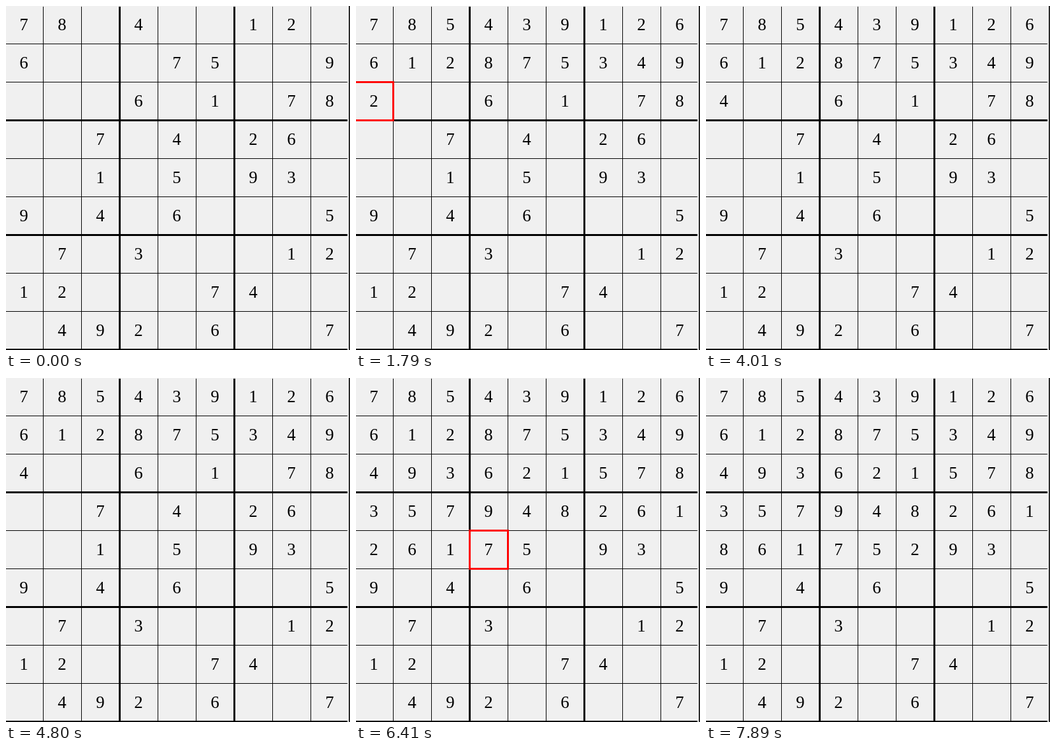
Animation, 540 px wide and 540 px high, one loop 8000 ms. Source, as an HTML page:

```html
<!DOCTYPE html>
<html lang="en">
<head>
<meta charset="utf-8">
<title>Sudoku backtracking</title>
<style>
  html, body { margin: 0; width: 100%; height: 100%; overflow: hidden; background: #f0f0f0; }
  svg { display: block; width: 540px; height: 540px; }
  line, rect { shape-rendering: crispEdges; }
  line { stroke: #000; }
  text { font: 27px "Liberation Serif", "Times New Roman", serif; text-anchor: middle; }
  #box { fill: none; stroke: #f00; stroke-width: 3; }
</style>
</head>
<body>
<svg viewBox="0 0 540 540">
  <clipPath id="view"><rect y="1" width="536" height="539"/></clipPath>
  <rect x="538" width="2" height="540" fill="#2a2a2a"/>
  <g clip-path="url(#view)">
    <g id="lines"></g>
    <g id="digits"></g>
    <rect id="box" width="60" height="60" visibility="hidden"/>
  </g>
</svg>
<script>
const LOOP = 8000, CELL = 60, LEFT = -2, TOP = -1;
const puzzle = [
  '78.4..12.', '6...75..9', '...6.1.78',
  '..7.4.26.', '..1.5.93.', '9.4.6...5',
  '.7.3...12', '12...74..', '.492.6..7'
].join('').split('').map(c => +c || 0);

// [step index, time in ms]; steps in between are evenly spaced
const pace = [
  [0, 510], [7, 1200], [8, 1310], [13, 1790], [14, 1870], [16, 2080],
  [17, 2200], [25, 2980], [26, 3080], [28, 3300], [29, 3400], [33, 3780],
  [34, 3910], [42, 4700], [43, 4800], [44, 4900], [50, 5510], [51, 5590],
  [52, 5700], [59, 6410], [60, 6490], [61, 6610], [69, 7410], [70, 7520], [74, 7890]
];

function stepTimes() {
  const times = [pace[0][1]];
  for (let k = 1; k < pace.length; k++) {
    const [i0, t0] = pace[k - 1], [i1, t1] = pace[k];
    for (let i = i0 + 1; i <= i1; i++)
      times.push(Math.round((t0 + (t1 - t0) * (i - i0) / (i1 - i0)) / 10) * 10);
  }
  return times;
}

// The solver compares rows and columns only.
function fits(grid, cell, digit) {
  const row = Math.floor(cell / 9), col = cell % 9;
  for (let i = 0; i < 9; i++)
    if (grid[row * 9 + i] === digit || grid[i * 9 + col] === digit) return false;
  return true;
}

function* solve(grid) {
  const cell = grid.indexOf(0);
  if (cell < 0) return true;
  for (let digit = 1; digit <= 9; digit++) {
    if (!fits(grid, cell, digit)) continue;
    grid[cell] = digit;
    yield { grid: [...grid], active: cell };
    if (yield* solve(grid)) return true;
    grid[cell] = 0;
    yield { grid: [...grid], active: -1 };
  }
  return false;
}

const times = stepTimes();
const states = [{ grid: puzzle, active: -1 }];
const solver = solve([...puzzle]);
while (states.length <= times.length) states.push(solver.next().value);

function add(parent, tag, attrs) {
  const node = document.createElementNS('http://www.w3.org/2000/svg', tag);
  for (const name in attrs) node.setAttribute(name, attrs[name]);
  return document.getElementById(parent).appendChild(node);
}

for (let i = 1; i <= 9; i++) {
  const x = LEFT + i * CELL + 0.5, y = TOP + i * CELL + 0.5;
  const width = i % 3 ? 1 : 3;
  add('lines', 'line', { x1: x, x2: x, y1: 0, y2: 540, 'stroke-width': width });
  add('lines', 'line', { x1: 0, x2: 540, y1: y, y2: y, 'stroke-width': width });
}

const cellX = cell => LEFT + cell % 9 * CELL;
const cellY = cell => TOP + Math.floor(cell / 9) * CELL;
const labels = puzzle.map((_, cell) =>
  add('digits', 'text', { x: cellX(cell) + 30, y: cellY(cell) + 39 }));
const box = document.getElementById('box');
let shown = -1;

function show(index) {
  const { grid, active } = states[index];
  grid.forEach((digit, cell) => { labels[cell].textContent = digit || ''; });
  box.setAttribute('visibility', active < 0 ? 'hidden' : 'visible');
  if (active >= 0) {
    box.setAttribute('x', cellX(active) + 0.5);
    box.setAttribute('y', cellY(active) + 0.5);
  }
  shown = index;
}

function tick() {
  const now = performance.now() % LOOP;
  const index = times.filter(t => t <= now).length;
  if (index !== shown) show(index);
  requestAnimationFrame(tick);
}
tick();
</script>
</body>
</html>
```
